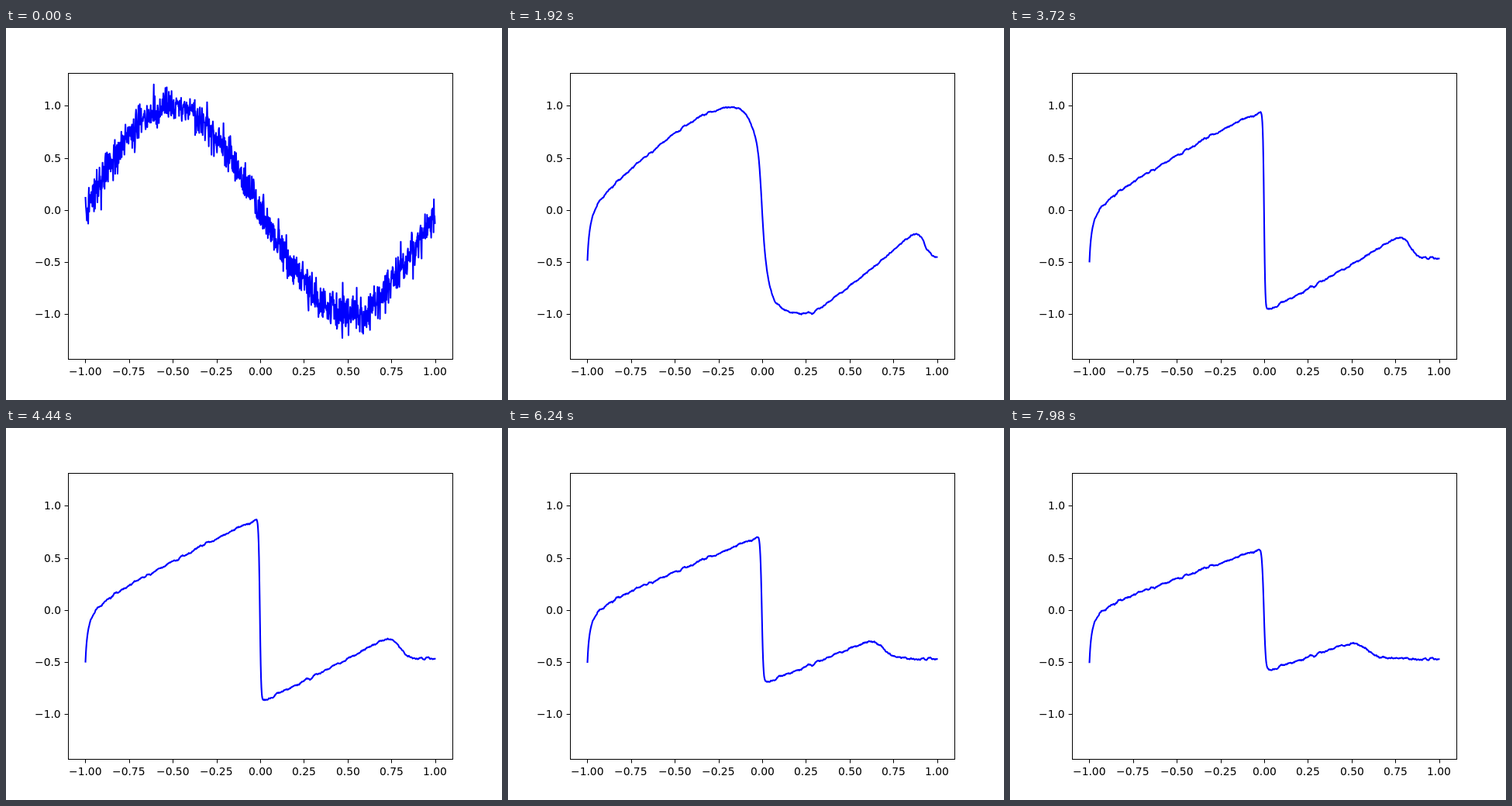
Recreate the animation shown at these times as an HTML page with a canvas. Size 640 by 480 pixels, loop 8000 ms.

```html
<!DOCTYPE html>
<html lang="en">
<head>
<meta charset="utf-8">
<title>Viscous wave plot</title>
<style>
  html, body { margin: 0; width: 100%; height: 100%; overflow: hidden; background: #fff; }
  canvas { display: block; width: 640px; height: 480px; }
</style>
</head>
<body>
<canvas id="stage" width="640" height="480"></canvas>
<script>
const ctx = document.getElementById('stage').getContext('2d');
const LOOP = 8000, STEP = 60, FRAMES = Math.ceil(LOOP / STEP);
const CELLS = 1024, DX = 2 / CELLS, NU = 0.01 / Math.PI;
const DT = 0.00025, SUBSTEPS = 40;

// The curve runs through cell centres, so it ends just short of -1 and 1.
const xAt = i => -1 + (i + 0.5) * DX;
const px = x => 328 + 225.675 * x;
const py = u => 234.75 - 134.3 * u;
const grid = fn => Array.from({ length: CELLS }, (_, i) => fn(xAt(i), i));

function seeded(seed) {
  return () => {
    seed = (seed + 0x6D2B79F5) | 0;
    let t = Math.imul(seed ^ (seed >>> 15), 1 | seed);
    t = (t + Math.imul(t ^ (t >>> 7), 61 | t)) ^ t;
    return ((t ^ (t >>> 14)) >>> 0) / 4294967296;
  };
}

// Nearly normal random numbers with unit deviation.
function gaussian(seed) {
  const rnd = seeded(seed);
  return () => {
    let sum = -3;
    for (let k = 0; k < 6; k++) sum += rnd();
    return sum * Math.SQRT2;
  };
}

// Small ripple that stays in place while the wave moves.
function fixedRipple() {
  const next = gaussian(7), reach = 5;
  const raw = grid(next);
  return grid((x, i) => {
    const near = raw.slice(Math.max(0, i - reach), i + reach + 1);
    const mean = near.reduce((s, v) => s + v, 0) / near.length;
    return 0.022 * mean * Math.min(1, (x + 1) / 0.06);
  });
}

// Boundary value that settles from zero to its end level.
function settle(t, level) {
  const p = t ** 1.5;
  return level * p / (p + 0.009);
}

// Burgers' equation with a noisy sine as its start.
function simulate() {
  const next = gaussian(41), ripple = fixedRipple();
  const a = DT / (4 * DX), d = NU * DT / (DX * DX), last = CELLS - 1;
  let u = grid(x => -Math.sin(Math.PI * x) + 0.092 * next());
  let v = u.slice(), t = 0;
  const frames = [u.slice()];
  for (let f = 1; f < FRAMES; f++) {
    for (let s = 0; s < SUBSTEPS; s++) {
      t += DT;
      for (let i = 1; i < last; i++) {
        const l = u[i - 1], r = u[i + 1];
        v[i] = u[i] - a * (r * r - l * l) + d * (r - 2 * u[i] + l);
      }
      v[0] = settle(t, -0.505);
      v[last] = settle(t, -0.472);
      [u, v] = [v, u];
    }
    const grow = 1 - 0.5 * Math.exp(-t / 0.2);
    frames.push(u.map((w, i) => w + grow * ripple[i]));
  }
  return frames;
}

function line(x1, y1, x2, y2) {
  ctx.beginPath();
  ctx.moveTo(x1, y1);
  ctx.lineTo(x2, y2);
  ctx.stroke();
}

// Aligns the visible ink of a label: 0.5 centres it on x, 1 ends it at x.
function label(value, digits, x, y, align) {
  const text = (value < 0 ? '\u2212' : '') + Math.abs(value).toFixed(digits);
  const m = ctx.measureText(text);
  const left = -m.actualBoundingBoxLeft, right = m.actualBoundingBoxRight;
  ctx.fillText(text, Math.round(x - left - align * (right - left)), y);
}

function drawAxes() {
  ctx.strokeStyle = ctx.fillStyle = '#000';
  ctx.lineWidth = 1;
  ctx.lineJoin = 'miter';
  ctx.lineCap = 'butt';
  ctx.strokeRect(80.5, 58.5, 496, 369);
  ctx.font = '13.889px "DejaVu Sans", sans-serif';
  for (let v = -1; v <= 1; v += 0.25) {
    const x = Math.round(px(v)) + 0.5;
    line(x, 427.5, x, 432.4);
    label(v, 2, px(v), 448, 0.5);
  }
  for (let v = -1; v <= 1; v += 0.5) {
    const y = Math.round(py(v)) + 0.5;
    line(75.6, y, 80.5, y);
    label(v, 1, 70.3, y + 4.5, 1);
  }
}

function drawCurve(u) {
  ctx.strokeStyle = '#00f';
  ctx.lineWidth = 2.083;
  ctx.lineJoin = 'round';
  ctx.lineCap = 'square';
  ctx.beginPath();
  u.forEach((v, i) => ctx.lineTo(px(xAt(i)), py(v)));
  ctx.stroke();
}

const frames = simulate();

function draw() {
  const f = Math.floor((performance.now() % LOOP) / STEP);
  ctx.fillStyle = '#fff';
  ctx.fillRect(0, 0, 640, 480);
  drawCurve(frames[f]);
  drawAxes();
  requestAnimationFrame(draw);
}
draw();
</script>
</body>
</html>
```
